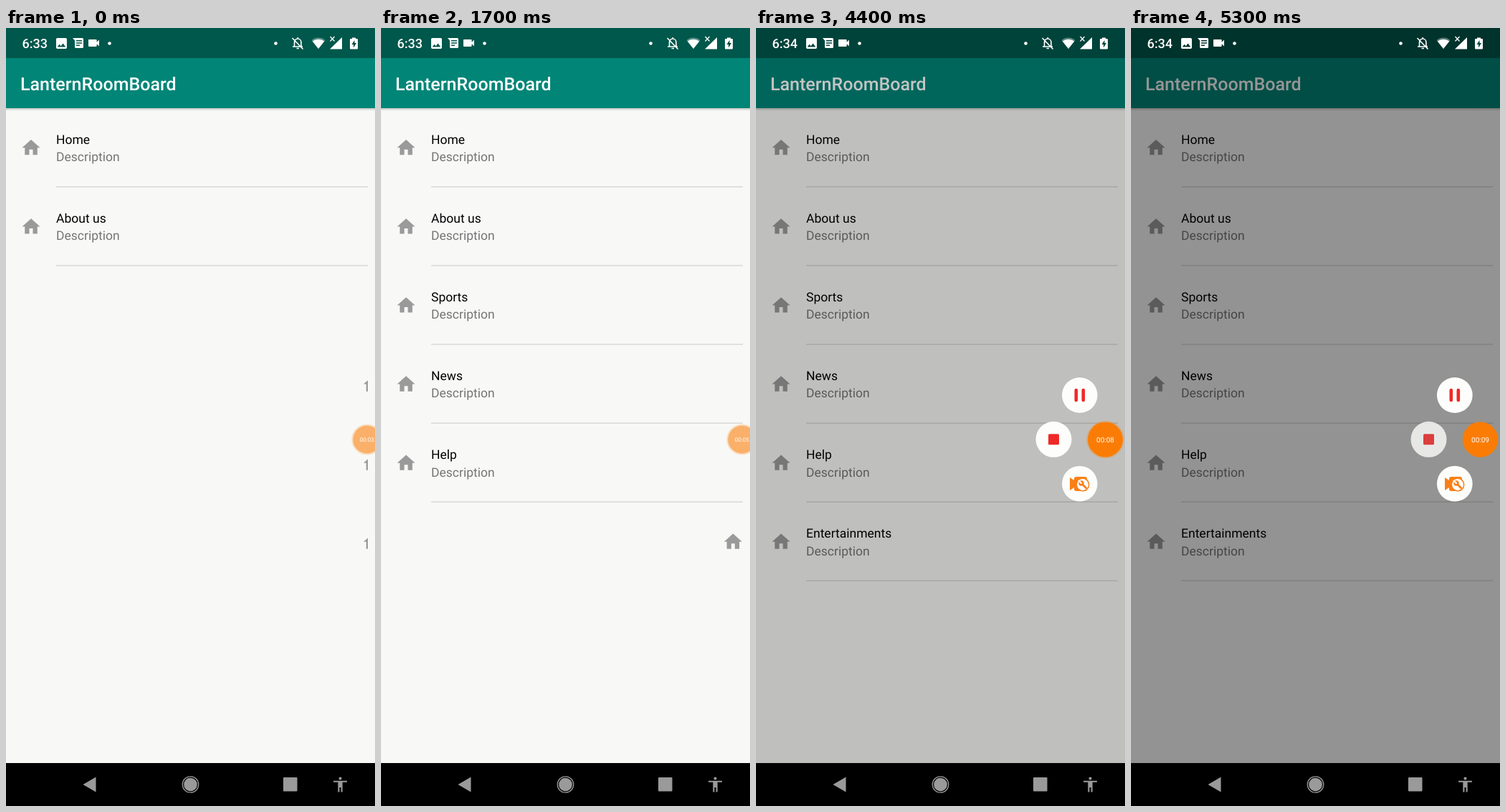
An HTML page that plays this animation: 515x1087 px, repeating every 5.4 s.

```html
<!DOCTYPE html>
<html lang="en">
<head>
<meta charset="utf-8">
<title>Home menu</title>
<style>
  html, body { margin: 0; width: 100%; height: 100%; overflow: hidden; background: #f8f9f7; }
  svg { display: block; width: 515px; height: 1087px; }
  text { font-family: Roboto, sans-serif; font-size: 17.53px; text-rendering: geometricPrecision; }
  .medium { font-weight: 500; fill: #fff; }
  .note { fill: #757575; }
  .timer { fill: #fff; font-size: 10px; text-anchor: middle; }
</style>
</head>
<body>
<svg viewBox="0 0 515 1087">
  <defs>
    <linearGradient id="shadow" x2="0" y2="1">
      <stop offset="0" stop-opacity=".2"/>
      <stop offset="1" stop-opacity="0"/>
    </linearGradient>
    <clipPath id="listArea"><rect y="112" width="505" height="915"/></clipPath>
    <path id="house" d="M10 20v-6h4v6h5v-8h3L12 3 2 12h3v8z"/>
  </defs>

  <rect width="515" height="1087" fill="#f8f9f7"/>
  <rect y="112" width="515" height="4" fill="url(#shadow)"/>
  <rect y="42" width="515" height="70" fill="#008577"/>
  <rect width="515" height="42" fill="#00574b"/>
  <text class="medium" x="20" y="87" style="font-size:25.04px">LanternRoomBoard</text>

  <g id="list" clip-path="url(#listArea)"></g>
  <rect id="dim" width="515" height="1027" opacity="0"/>

  <!-- Status bar -->
  <g fill="#fff">
    <text id="clock" class="medium" x="22.5" y="28.3" style="font-size:18px"></text>
    <path transform="translate(67.5 11.5) scale(.83)" d="M21 19V5c0-1.1-.9-2-2-2H5c-1.1 0-2 .9-2 2v14c0 1.1.9 2 2 2h14c1.1 0 2-.9 2-2zM8.5 13.5l2.5 3L14.500 12l4.500 6H5z"/>
    <path fill-rule="evenodd" d="M93 14h13.500q1.500 0 1.500 1.500v11q0 1.500-1.500 1.500h-9q-1.500 0-1.500-1.500v-9zM98 17v1.500h8V17zm0 3.200v1.500h8v-1.500zm0 3.200v1.500h5v-1.500z"/>
    <path transform="translate(112.500 11) scale(.83)" d="M17 10.500V7c0-.55-.45-1-1-1H4c-.55 0-1 .45-1 1v10c0 .55.45 1 1 1h12c.55 0 1-.45 1-1v-3.500l4 4v-11z"/>
    <circle cx="144.500" cy="21.500" r="2.300"/>
    <circle cx="376.500" cy="21.500" r="2.300"/>
    <path fill="none" stroke="#fff" stroke-width="1.600" d="M400 26h14M402.500 26v-6a4.700 5 0 0 1 9.400 0v6M407.200 15v-2M405.500 28.500h3.500M399.500 14l15 15.500"/>
    <path opacity=".35" d="M436 29l-9.500-12a15 15 0 0 1 19 0z"/>
    <path d="M436 29l-8.300-10.400a13.500 13.500 0 0 1 16.600 0z"/>
    <path d="M469 13v16.500h-17z"/>
    <path fill="none" stroke="#fff" stroke-width="1.300" d="M452.500 12l6 6.500m0-6.500l-6 6.500"/>
    <path d="M483 13.500h5V15h2q1 0 1 1v12.500q0 1-1 1h-9q-1 0-1-1V16q0-1 1-1h2z"/>
    <path fill="#00473c" d="M486.500 17l-4 6h2.500v4.500l4-6.500h-2.500z"/>
  </g>

  <!-- Navigation bar -->
  <rect y="1027" width="515" height="60"/>
  <g fill="#9a9a9a">
    <path d="M107.500 1057l18-10.500v21z"/>
    <circle cx="257.500" cy="1057" r="9.300"/>
    <circle cx="257.500" cy="1057" r="11.200" fill="none" stroke="#9a9a9a" stroke-width="1.300"/>
    <rect x="387" y="1047" width="19.500" height="19.500" rx="1"/>
    <path transform="translate(453.900 1044.300) scale(1.050)" d="M12 2a2 2 0 0 1 0 4 2 2 0 0 1 0-4zm9 7h-6v13h-2v-6h-2v6H9V9H3V7h18z"/>
  </g>

  <!-- Recorder controls -->
  <g id="controls">
    <g fill="#fdfefc" stroke="#000" stroke-opacity=".08">
      <circle cx="451.800" cy="513" r="25"/>
      <circle cx="451.800" cy="636.700" r="25"/>
    </g>
    <path d="M446.800 506v14m10-14v14" stroke="#ee2a28" stroke-width="4.600" stroke-linecap="round"/>
    <g id="stop">
      <circle cx="415.500" cy="574.800" r="25" fill="#fdfefc"/>
      <rect x="408" y="567.300" width="15" height="15" rx="1.500" fill="#ee2a28"/>
    </g>
    <g fill="#f98018">
      <path d="M438 628l6 4v-2q0-3 3-3h12q3 0 3 3v14q0 3-3 3h-12q-3 0-3-3v-2l-6 4z"/>
      <circle cx="456" cy="638" r="8.700" fill="#fff" stroke="#f98018" stroke-width="1.500"/>
      <path d="M454.500 636.500l6 6" stroke="#f98018" stroke-width="2.800" stroke-linecap="round"/>
      <circle cx="454" cy="636" r="3.700"/>
      <path d="M450 632l4.500 4.500" stroke="#fff" stroke-width="2.400"/>
    </g>
  </g>
  <g id="badge">
    <circle id="ring" r="27" fill="#fb7c04"/>
    <circle id="disc" r="24.500" fill="#fb7c04"/>
    <text id="timer" class="timer" y="3.600"></text>
  </g>
  <circle id="dot" cx="508.500" cy="575" r="5.200" fill="#fb8448"/>
</svg>

<script>
const LOOP = 5400, STEP = 100;
const ROW_HEIGHT = 110.1, SLIDE_FROM = 476.5, SLIDE_TIME = 500, FIRST_SLIDE = -83;
const titles = ['Home', 'About us', 'Sports', 'News', 'Help', 'Entertainments'];
const $ = id => document.getElementById(id);
const set = (id, attrs) => {
  for (const name in attrs) $(id).setAttribute(name, attrs[name]);
};
const clamp = x => Math.min(1, Math.max(0, x));

$('list').innerHTML = titles.map(title => `<g>
  <use href="#house" transform="translate(20 152.300) scale(1.252)" fill="#999a99"/>
  <text x="70" y="161.800">${title}</text>
  <text class="note" x="70" y="186.200">Description</text>
  <rect x="70" y="221" width="435" height="1.600" fill="#dadbda"/>
</g>`).join('');
const rows = [...$('list').children];

// Pulls back a little before moving forward.
const anticipate = p => p * p * (2 * p - 1);

function drawRows(t) {
  rows.forEach((row, i) => {
    const start = FIRST_SLIDE + (i - 2) * SLIDE_TIME;
    const progress = clamp((t - start) / SLIDE_TIME);
    const x = SLIDE_FROM * (1 - anticipate(progress));
    row.setAttribute('transform', `translate(${x} ${i * ROW_HEIGHT})`);
  });
}

function drawBadge(t) {
  const docked = t >= 1900 && t < 4200;
  const small = t < 1900;
  const fade = clamp((t - 4300) / 200);
  const x = small ? 503.8 : docked ? 521.5 : 487.5;
  set('badge', { transform: `translate(${x} 575) scale(${small ? 0.8 : 1})` });
  set('ring', { opacity: t < 4200 ? 0.2 : 0.4 - 0.28 * fade, r: 27 - fade });
  set('disc', { opacity: small ? 0.48 : docked ? 0.42 : 1 });
  set('dot', { visibility: docked ? 'visible' : 'hidden' });
  set('timer', { visibility: docked ? 'hidden' : 'visible' });
  $('timer').textContent = '00:0' + (3 + Math.floor((t + 800) / 1000));
}

function draw(t) {
  drawRows(t);
  drawBadge(t);
  $('clock').textContent = t < 2600 ? '6:33' : '6:34';
  set('dim', { opacity: t < 4400 ? 0 : t < 4500 ? 0.23 : 0.41 });
  set('controls', { visibility: t < 4400 ? 'hidden' : 'visible' });
  set('stop', { opacity: 1 - 0.2 * clamp((t - 4900) / 400) });
}

const began = performance.now();
function tick() {
  const t = (performance.now() - began) % LOOP;
  draw(Math.floor(t / STEP) * STEP);
  requestAnimationFrame(tick);
}
tick();
</script>
</body>
</html>
```
